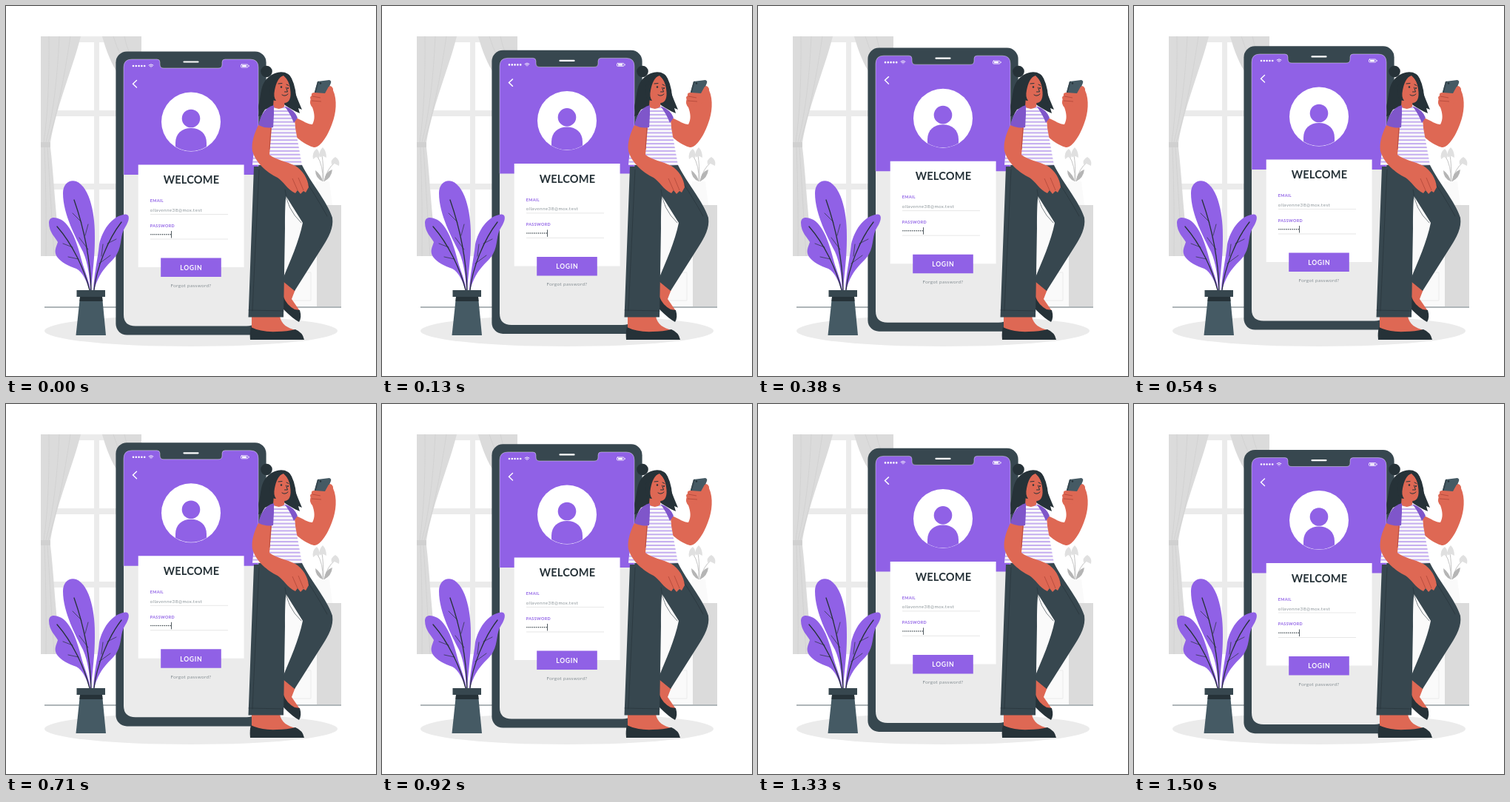
An HTML page for the animation above (1540 ms loop, 500 px wide and 500 px high).

```html
<!DOCTYPE html>
<html lang="en">
<head>
<meta charset="utf-8">
<title>Welcome screen</title>
<style>
  html, body { margin: 0; height: 100%; overflow: hidden; background: #fff; }
  svg { display: block; width: 100vw; height: 100vh; }
  text { font-family: Lato, sans-serif; }
  .purple { fill: #9061e6; }
  .sleeve { fill: #7f56ca; }
  .dark { fill: #263238; }
  .slate { fill: #37474f; }
  .skin { fill: #de6854; }
  .line { fill: none; stroke: #263238; stroke-linecap: round; stroke-linejoin: round; }
  .crease { fill: none; stroke: #a94335; stroke-width: .7; }
  .label { font-size: 5.4px; font-weight: 700; letter-spacing: .4px; }
  .small { font-size: 6.4px; font-weight: 300; letter-spacing: .4px; }
</style>
</head>
<body>
<svg viewBox="0 0 500 500">
  <defs>
    <pattern id="stripes" y="140" width="8" height="4.9" patternUnits="userSpaceOnUse">
      <path d="M0 2H8" stroke="#9061e6"/>
    </pattern>
    <path id="shirt" d="M361 135L375 136C385 140 391 150 391 165L400 215H333C336 185 342 150 350 140Z"/>
    <path id="header" d="M159 228V83Q159 72 170 72H204Q208 72 208 76V79Q208 84 213 84H287Q292 84 292 79V76Q292 72 296 72H330Q341 72 341 83V228"/>
  </defs>

  <ellipse cx="250" cy="439" rx="198" ry="21" fill="#ebebeb"/>

  <g id="window">
    <path d="M60 41H183V49H60ZM119 49H126V338H119ZM60 141H183V149H60ZM60 240H183V248H60Z" fill="#ebebeb"/>
    <path d="M47 41H101C91 82 69 132 60 184V191C65 232 67 292 75 338H47ZM130 41H183V125C160 110 141 82 130 41Z" fill="#dbdbdb"/>
    <path d="M58 41Q59 130 51 184M72 41Q68 130 54 184M87 41Q74 130 57 184M52 191Q55 270 54 338M56 191Q61 270 65 338M145 41Q154 70 172 96M160 41Q164 64 180 87" fill="none" stroke="#cfcfcf" stroke-width=".7"/>
    <path d="M47 184H60V191H47Z" fill="#d0d0d0"/>
  </g>

  <g id="cabinet">
    <path d="M340 269H421V406H340Z" fill="#fafafa"/>
    <path d="M420 269H453V406H420Z" fill="#dbdbdb"/>
    <path d="M350 360H412V398H350Z" fill="none" stroke="#ebebeb"/>
    <path d="M419 237H437L441 269H415Z" fill="#fafafa"/>
    <path d="M428 237Q429 215 420 202M429 237Q429 213 427 202M430 237Q434 219 445 211" fill="none" stroke="#c4c4c4"/>
    <path d="M428 237Q418 233 418 222Q426 228 428 237M430 237Q431 224 441 221Q440 232 430 237" fill="#b5b5b5"/>
    <path d="M420 193Q413 198 415 207L419 204L423 206Q425 198 420 193M428 191Q422 197 424 204L429 203L433 205Q433 196 428 191M445 204Q438 208 440 214L444 213L450 216Q452 208 445 204" fill="#e0e0e0"/>
  </g>
  <path d="M52 407H453" stroke="#37474f" stroke-width=".8"/>

  <g id="phone">
    <rect class="slate" x="148.4" y="61.4" width="203.2" height="383.2" rx="15"/>
    <path d="M159 200H341V417Q341 432.500 325 432.500H175Q159 432.500 159 417Z" fill="#ebebeb"/>
    <use href="#header" class="purple" stroke="#fff" stroke-width=".4"/>
    <g fill="none" stroke="#fff" stroke-linecap="round">
      <path d="M240.5 75.5H259.5" stroke-width="2.2"/>
      <path d="M172 81H188" stroke-width="2.6" stroke-dasharray="0 3.8"/>
      <path d="M193 80Q196 77.4 199 80M194.3 81.4Q196 80 197.7 81.4M196 82.8V82.8" stroke-width=".9"/>
      <rect x="317.5" y="79" width="9.5" height="4" rx="1" stroke-width=".8"/>
      <path d="M319 81H325" stroke-width="2.4" stroke-linecap="butt"/>
      <path d="M328.3 80.5V81.5" stroke-width=".8"/>
      <path d="M176.5 100.5L171.5 105.2L176.5 110" stroke-width="1.4"/>
    </g>
    <circle cx="250" cy="156.5" r="40" fill="#fff"/>
    <g class="purple">
      <circle cx="250" cy="152" r="12.3"/>
      <path d="M229 190V185C229 172 238 165 250 165S271 172 271 185V190A39.5 39.5 0 0 1 229 190Z"/>
    </g>

    <path d="M178.7 214.5H321.6V353H178.7Z" fill="#fff"/>
    <text class="dark" x="250.5" y="240.3" font-size="14.6" font-weight="700" letter-spacing=".2" text-anchor="middle">WELCOME</text>
    <text class="label purple" x="194.7" y="265.2">EMAIL</text>
    <text class="small slate" x="194.7" y="278">ollavenne38@mox.test</text>
    <text class="label purple" x="194.7" y="298.8">PASSWORD</text>
    <path class="line" d="M196 308.7H222.5" stroke-width="1.5" stroke-dasharray="0 2.6"/>
    <path d="M223.5 304V313.5" stroke="#263238" stroke-width=".8"/>
    <path d="M195 281.5H300M195 315H300" stroke="#cfcfcf" stroke-width=".5"/>
    <path class="purple" d="M209.2 340.5H290.8V366H209.2Z"/>
    <text x="250.3" y="356.8" fill="#fff" font-size="8.6" font-weight="700" letter-spacing=".7" text-anchor="middle">LOGIN</text>
    <text class="small slate" x="250" y="380" text-anchor="middle">Forgot password?</text>
  </g>

  <g id="plant">
    <g class="purple">
      <path d="M114 384C113 366 111 348 104 332C95 314 77 282 77 253C77 240 86 234 95 237C114 245 121 284 120 315C120 340 117 358 115 384Z"/>
      <path d="M113 384C108 370 104 360 95 355C84 351 75 347 69 339C64 331 68 326 70 319C67 313 58 306 58 293C58 285 65 284 75 289C91 299 98 328 104 350C108 362 112 372 114 384Z"/>
      <path d="M118 384C119 362 124 342 126 322C130 304 142 284 161 281.500C168 281 167 290 161 299C154 309 157 323 150 335C144 347 128 352 119 384Z"/>
    </g>
    <g class="line">
      <path d="M115 384C114 346 106 302 92 262M113 384C106 356 90 322 69 298M119 384C122 354 138 315 156 292" stroke-width="1.3"/>
      <path d="M102 292L90 280M107 310L111 295M111 329L99 313M90 326L77 321M98 342L84 339M137 321L149 315M129 338L131 322M126 348L141 337" stroke-width=".7"/>
    </g>
    <path class="slate" d="M95.500 384H134V393H95.500Z"/>
    <path d="M100 393H130L135 445H94.500Z" fill="#455a64"/>
    <path class="dark" d="M100 393H130L130.600 399H99.400Z"/>
  </g>

  <g id="woman">
    <path class="skin" d="M374 370L391 383L386 396L397 412L388 416L375 396Z"/>
    <path class="dark" d="M375 393Q379 404 390 410L397 411Q400 421 396 427Q388 423 374 409Z"/>
    <path class="slate" d="M368 216L400 215C412 239 434 264 441 286C443 300 436 312 428 325L390 385L373 371C384 345 396 318 401 293L374 250Z"/>
    <path class="skin" d="M332 419H370C372 431 381 435 391 438V444H332Z"/>
    <path class="dark" d="M331 434Q345 441 366 440Q380 440 391 437Q401 441 403 451H330Q329 441 331 434Z"/>
    <path class="slate" d="M335 217H390L380 248C377 260 377 280 377 300L375 420.500H327.500Z"/>
    <path class="line" d="M342 221L333 412M328 411L375 412M377 248Q379 274 399 293M395 221Q418 255 434 284" stroke-width=".6"/>

    <path class="dark" d="M355 96C366 86 383 87 386 99C389 115 395 128 400 140L395 138L397 145C381 138 373 131 369 128C363 136 355 145 341 149C343 142 340 138 342 131C345 118 344 105 355 96Z"/>
    <circle class="dark" cx="352" cy="88.500" r="7.800"/>
    <path class="skin" d="M386 151L394 152C401 155 408 160 414 160C418 153 417 145 414 137C409 132 411 123 416 119L428 117L434 109Q441 106 442 114C448 127 446 145 441 158C436 173 425 192 416 191C405 188 397 181 391 176Z"/>
    <use href="#shirt" fill="#fafafa"/>
    <use href="#shirt" fill="url(#stripes)"/>
    <path class="sleeve" d="M376 135Q390 140 394 151L389 158Q384 145 376 135Z"/>
    <path class="skin" d="M362 122H377L376 136Q369 142 361 136Z"/>
    <path class="skin" d="M361 110Q365 97 375 94Q383 101 384 112C386 124 383 131 376 131C367 131 360 125 359 117Z"/>
    <path class="dark" d="M375 93C368 97 365 104 363 114Q361 123 365 128Q356 128 355 114Q357 98 375 93M373 92Q382 98 384 109Q387 122 392 132Q393 112 386 98Q381 90 373 92Z"/>
    <path class="line" d="M368 105L373 104.500M379 106L382 107.500M378.500 110L380.500 116L376.500 116M373 120Q377 123 381 119" stroke-width="1"/>
    <circle class="dark" cx="372" cy="109.500" r="1.200"/>
    <circle class="dark" cx="381" cy="111" r="1.100"/>

    <path class="skin" d="M341 161C336 171 331 185 333 196C337 211 352 225 367 232C374 236 381 249 391 253L394 249L398 254L402 250L405 252L409 245C408 233 401 222 391 216C379 210 365 208 356 201L359 164Z"/>
    <path class="sleeve" d="M362 134C350 137 344 148 341 161Q351 166 361 164L362 147Z"/>
    <path class="crease" d="M387 233L394 249M395 232L402 249M358 165L356 194"/>

    <path d="M421 102L437 100Q440 101 439 104L433 119L416 120Z" fill="#455a64"/>
    <path class="slate" d="M421 102L423 101.700L418 120H416Z"/>
    <circle class="dark" cx="425" cy="104.500" r="1.200"/>
    <path class="skin" d="M436 109Q441 107 442 113L440 125L427 135L413 134Q409 130 413 127Q409 124 413 121Q412 117 417 117L431 118Z"/>
    <path class="crease" d="M414 122L425 124M413 128L426 129"/>
  </g>
</svg>
<script>
  const LOOP = 1540, STEPS = 37, FPS = 24, LIFT = 10;
  const phone = document.getElementById('phone');

  // The phone rises and sinks at constant speed, in 24 fps steps.
  function draw(now) {
    const step = Math.min(STEPS - 1, Math.floor((now % LOOP + 5) * FPS / 1000));
    const phase = (step + 1) / STEPS;
    const lift = LIFT * (1 - Math.abs(1 - 2 * phase));
    phone.setAttribute('transform', `translate(0 ${0.54 - lift})`);
  }

  const start = performance.now();
  function tick() {
    draw(performance.now() - start);
    requestAnimationFrame(tick);
  }
  tick();
</script>
</body>
</html>
```
